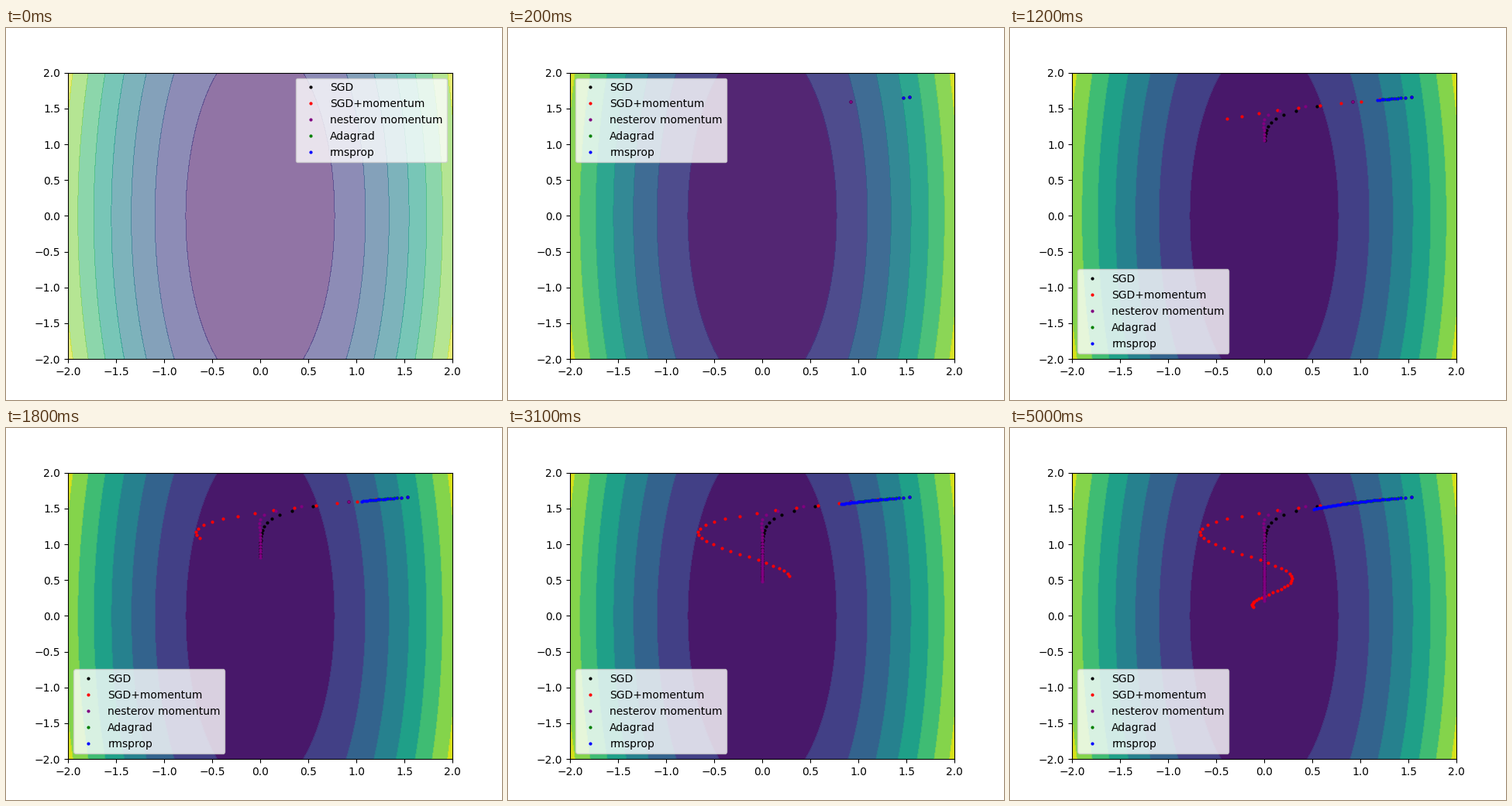
Recreate the animation shown at these times as a matplotlib script. Size 640 by 480 pixels, loop 5100 ms.

```python
import matplotlib.pyplot as plt
import numpy as np
from matplotlib.animation import FuncAnimation

FRAMES = 51
LAYERS = 12  # translucent contour layers; more make no visible difference
START = np.array([1.53, 1.66])
CURVATURE = np.array([2.0, 0.2])


def grad(p):
    """Gradient of x^2 + 0.1 y^2."""
    return CURVATURE * p


def sgd(p, state, lr=0.2):
    return p - lr * grad(p), state


def momentum(p, v, lr=0.2, rho=0.9):
    v = rho * v + (1 - rho) * grad(p)
    return p - lr * v, v


def nesterov(p, v, lr=0.2, rho=0.5):
    v = lr * grad(p + rho * v)
    return p - v, v


def adagrad(p, cache, lr=0.06):
    g = grad(p)
    cache = cache + g @ g
    return p - lr * g / np.sqrt(cache), cache


def rmsprop(p, cache, lr=0.02, decay=0.9):
    g = grad(p)
    cache = decay * cache + (1 - decay) * (g @ g)
    return p - lr * g / np.sqrt(cache), cache


def trace(step):
    p, state = START, 0.0
    points = [p]
    for _ in range(FRAMES - 2):
        p, state = step(p, state)
        points.append(p)
    return np.array(points)


METHODS = [
    ("SGD", "black", sgd),
    ("SGD+momentum", "red", momentum),
    ("nesterov momentum", "purple", nesterov),
    ("Adagrad", "green", adagrad),
    ("rmsprop", "blue", rmsprop),
]

fig, ax = plt.subplots(figsize=(6.4, 4.8), dpi=100)

axis = np.linspace(-2, 2, 100)
X, Y = np.meshgrid(axis, axis)
Z = X**2 + 0.1 * Y**2
levels = np.arange(9) * 0.6
layers = [ax.contourf(X, Y, Z, levels, alpha=0.6) for _ in range(LAYERS)]

paths = [trace(step) for _, _, step in METHODS]
lines = [
    ax.plot([], [], "o", color=color, markersize=2, label=label)[0]
    for label, color, _ in METHODS
]
ax.set(xlim=(-2, 2), ylim=(-2, 2))
legend = ax.legend(loc="upper right")


def legend_place(i):
    """Keep the legend clear of the dots."""
    if i == 0:
        return "upper right"
    return "upper left" if i < 12 else "lower left"


def update(i):
    for n, layer in enumerate(layers):
        layer.set_visible(n <= i)
    for line, path in zip(lines, paths):
        line.set_data(path[:i, 0], path[:i, 1])
    legend.set_loc(legend_place(i))
    return lines


anim = FuncAnimation(fig, update, frames=FRAMES, interval=100,
                     init_func=lambda: update(0), repeat=True, repeat_delay=0)
plt.show()
```
